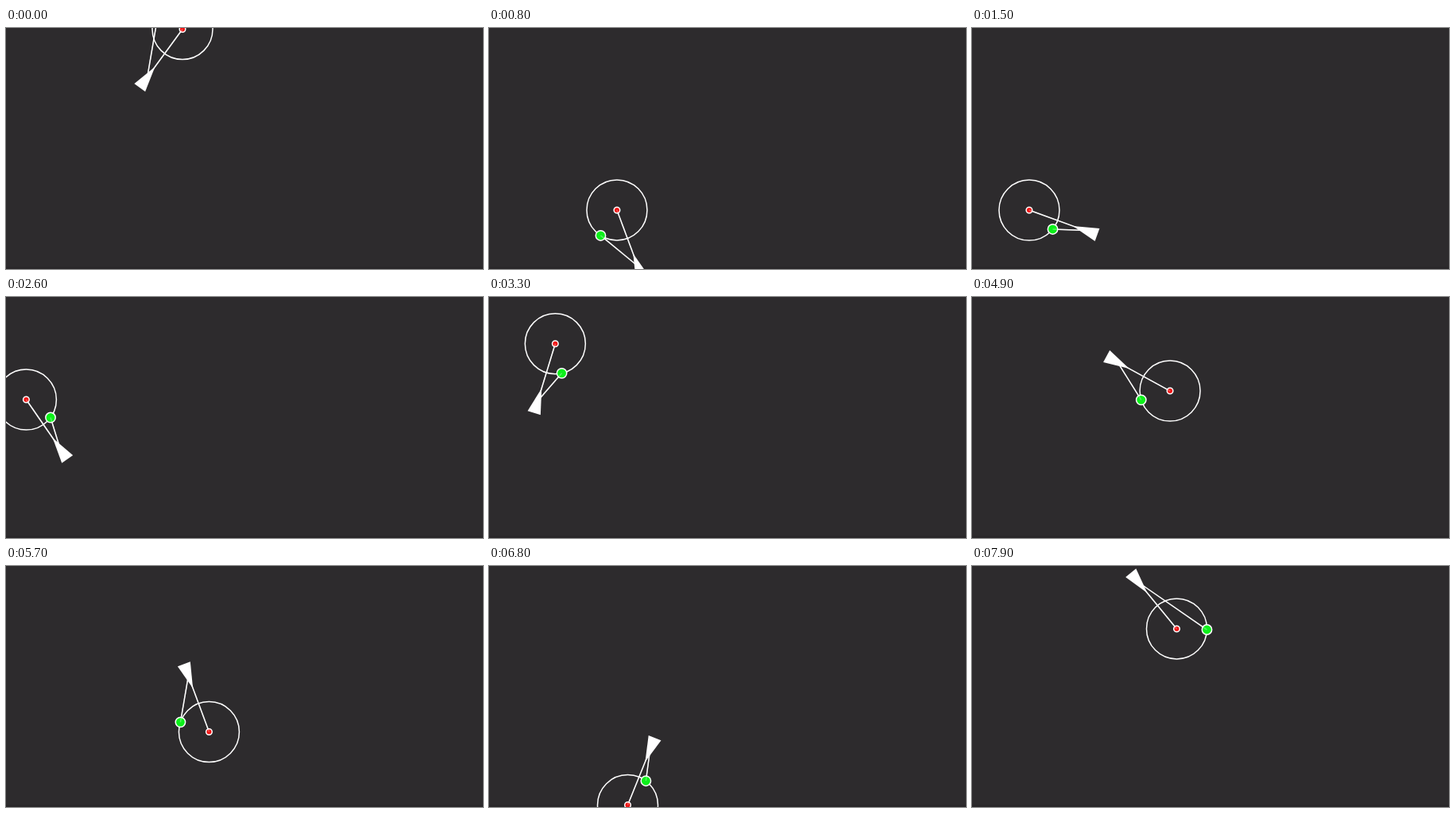
An HTML page with a canvas that plays this animation: 600x303 px, repeating every 8 s.

```html
<!DOCTYPE html>
<html lang="en">
<head>
<meta charset="utf-8">
<title>Wander steering</title>
<style>
  html, body { margin: 0; width: 100%; height: 100%; overflow: hidden; background: #2d2b2d; }
  canvas { display: block; }
</style>
</head>
<body>
<canvas id="stage" width="600" height="303"></canvas>
<script>
const ctx = document.getElementById('stage').getContext('2d');
const W = 600, H = 303, LOOP = 8000, STEP = 100;
const AHEAD = 75, RADIUS = 38, SPEED = 9.2;
const EDGE = 4, WRAP = 308;   // the vehicle leaves at one edge and returns at the other

// time, heading in degrees
const headings = [
  [0, -53.8], [900, -117.5], [1500, -160.1], [1600, -166], [1800, -152],
  [2200, -129], [2500, -130], [2600, -124.7], [2700, -116], [3600, -51.5],
  [3850, -43.5], [4000, -31.1], [4500, 4.6], [5400, 58.5], [5700, 69.7],
  [6300, 119], [6500, 125], [6800, 112], [7600, 73], [7900, 50.6]
];

// time, angle of the green dot on the circle relative to the heading
const wander = [
  [0, -88], [1500, -161], [1600, -180], [2600, -199], [4000, -220],
  [5700, -231], [6450, -180], [6800, -165], [7900, -49]
];

// time, x, y of the vehicle, with y unwrapped
const anchors = [
  [0, 177.7, 62], [1500, 142.5, -53.4], [2600, 68.1, -117.3], [4000, 102.8, -225.7],
  [5700, 229.4, -169.8], [6800, 202.6, -77], [7900, 209.9, 21]
];

function sample(table, t) {
  let i = 1;
  while (i < table.length - 1 && table[i][0] < t) i++;
  const [t0, a] = table[i - 1], [t1, b] = table[i];
  return (a + (b - a) * (t - t0) / (t1 - t0)) * Math.PI / 180;
}

const polar = (p, r, a) => ({ x: p.x + r * Math.cos(a), y: p.y + r * Math.sin(a) });

// Follow the heading, spreading the small drift evenly between anchors.
function buildPath() {
  const path = [];
  for (let i = 1; i < anchors.length; i++) {
    const [t0, x0, y0] = anchors[i - 1], [t1, x1, y1] = anchors[i];
    const n = (t1 - t0) / STEP;
    const run = [{ x: x0, y: y0 }];
    for (let k = 0; k < n; k++) {
      run.push(polar(run[k], SPEED, sample(headings, t0 + (k + 0.5) * STEP)));
    }
    const dx = x1 - run[n].x, dy = y1 - run[n].y;
    run.forEach((p, k) => {
      path[t0 / STEP + k] = { x: p.x + dx * k / n, y: p.y + dy * k / n };
    });
  }
  return path;
}

const path = buildPath();
const wrapY = y => ((y + EDGE) % WRAP + WRAP) % WRAP - EDGE;

function line(a, b) {
  ctx.beginPath();
  ctx.moveTo(a.x, a.y);
  ctx.lineTo(b.x, b.y);
  ctx.stroke();
}

function circle(p, r, fill) {
  ctx.beginPath();
  ctx.arc(p.x, p.y, r, 0, 2 * Math.PI);
  if (fill) {
    ctx.fillStyle = fill;
    ctx.fill();
  }
  ctx.stroke();
}

function vehicle(p, a) {
  ctx.save();
  ctx.translate(p.x, p.y);
  ctx.rotate(a);
  ctx.beginPath();
  ctx.moveTo(16.5, 0);
  ctx.lineTo(-16, -8.5);
  ctx.lineTo(-16, 8.5);
  ctx.fillStyle = '#fff';
  ctx.fill();
  ctx.restore();
}

function draw(time) {
  const index = Math.floor(time % LOOP / STEP), t = index * STEP;
  const pos = { x: path[index].x, y: wrapY(path[index].y) };
  const heading = sample(headings, t);
  const center = polar(pos, AHEAD, heading);
  const goal = polar(center, RADIUS, heading + sample(wander, t));

  ctx.fillStyle = '#2d2b2d';
  ctx.fillRect(0, 0, W, H);
  ctx.fillStyle = '#292729';
  ctx.fillRect(0, 300, W, 3);

  ctx.strokeStyle = '#fff';
  ctx.lineWidth = 1.5;
  circle(center, RADIUS);
  line(pos, center);
  line(pos, goal);
  circle(center, 3.8, '#f01414');
  circle(goal, 6.2, '#0cf01a');

  // the lines show faintly through the dots
  ctx.globalAlpha = 0.3;
  line(pos, center);
  line(pos, goal);
  ctx.globalAlpha = 1;
  vehicle(pos, heading);
}

const start = performance.now();
function tick() {
  draw(performance.now() - start);
  requestAnimationFrame(tick);
}
tick();
</script>
</body>
</html>
```
